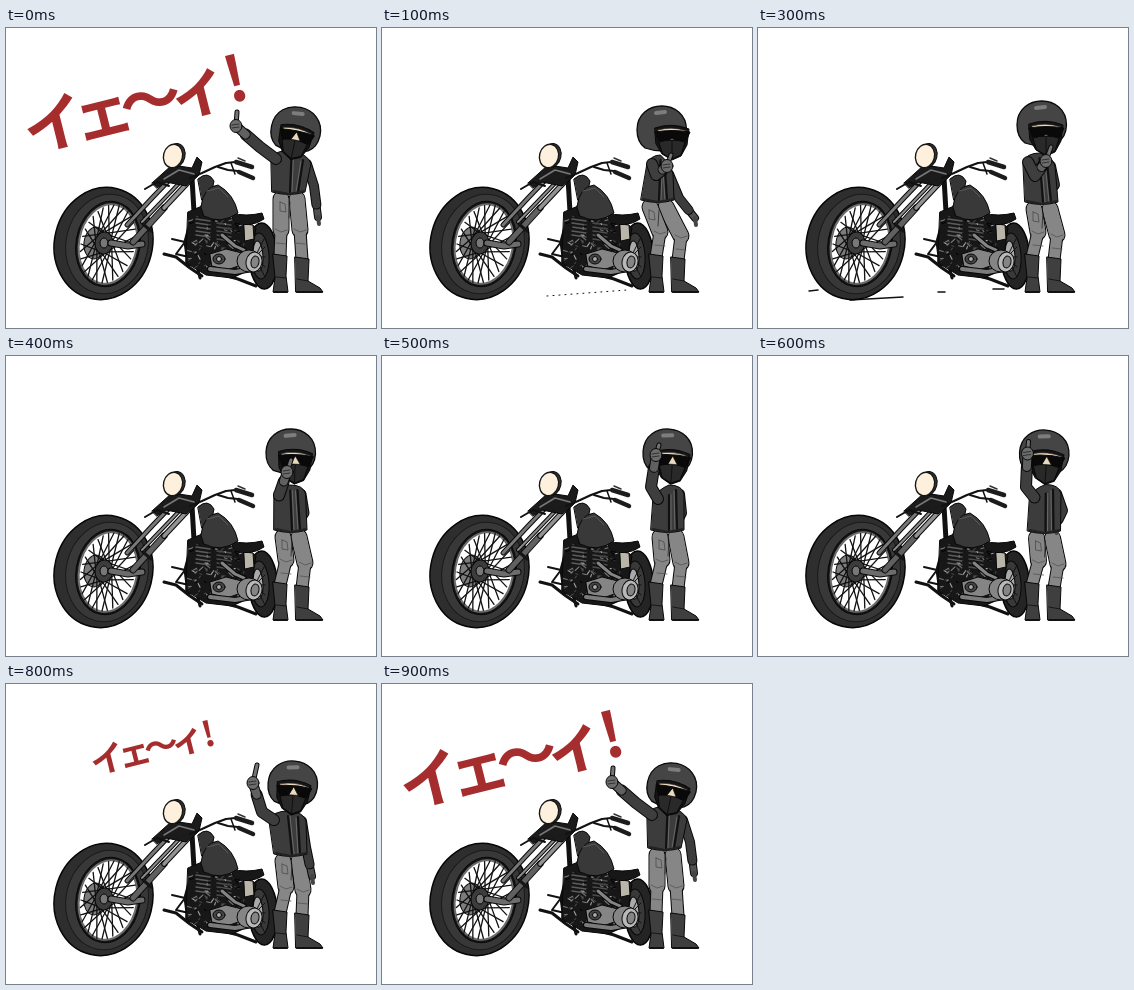
An HTML page that plays this animation: 370 px wide and 300 px high, repeating every 1000 ms.

```html
<!DOCTYPE html>
<html lang="ja">
<head>
<meta charset="utf-8">
<style>
html, body { margin: 0; width: 100%; height: 100%; overflow: hidden; background: #fff; }
svg { display: block; width: 100vw; height: 100vh; }
text {
  font: 700 62px "Noto Sans CJK JP", "Noto Sans CJK", sans-serif;
  letter-spacing: -0.2em; fill: #a52d2e; text-anchor: middle;
}
</style>
</head>
<body>
<svg viewBox="0 0 370 300" stroke-linecap="round" stroke-linejoin="round">
  <g id="shadow" fill="none" stroke="#111"></g>
  <g id="bike"></g>
  <g id="rider"></g>
  <text id="shout" y="23.5">イェ～ィ<tspan dx="8">!</tspan></text>
</svg>
<script>
const STEP = 100, STEPS = 10;
const $ = id => document.getElementById(id);
const mix = (a, b, t) => a + (b - a) * t;
const between = (p, q, t) => p.map((v, i) => mix(v, q[i], t));

function shape(d, fill, stroke = '#080808', width = 1) {
  return `<path d="${d}" fill="${fill}" stroke="${stroke}" stroke-width="${width}"/>`;
}
function line(points, width, color) {
  return shape('M' + points.map(p => p.join(' ')).join('L'), 'none', color, width);
}
function tube(points, width, color) {
  return line(points, width + 2, '#080808') + line(points, width, color);
}
function oval(x, y, rx, ry, fill, turn = 0, stroke = '#080808', width = 1) {
  return `<ellipse cx="${x}" cy="${y}" rx="${rx}" ry="${ry}" fill="${fill}" stroke="${stroke}"
    stroke-width="${width}" transform="rotate(${turn} ${x} ${y})"/>`;
}
function seeded(seed) {
  return () => (seed = (seed * 16807) % 2147483647) / 2147483647;
}

function frontWheel() {
  let s = oval(97.5, 215.5, 49, 56.5, '#2e2e2e', 14, '#050505', 1.5);
  s += oval(101, 216, 41, 50, '#383838', 12, '#1a1a1a', 1);
  s += oval(102, 216, 32, 43, '#161616', 10);
  s += oval(102, 216, 29, 40, '#fff', 10, '#6c6c6c', 2);
  s += oval(89, 215, 11, 16, '#7c7c7c', 8);
  for (let i = 0; i < 32; i++) {
    const a = i * Math.PI / 16, b = a + (i % 2 ? 0.9 : -0.9);
    const rim = [102 + 27 * Math.cos(a) - 6 * Math.sin(a), 216 + 39 * Math.sin(a)];
    s += line([[98 + 8 * Math.cos(b), 215 + 10 * Math.sin(b)], rim], 1.3, '#111');
  }
  return s + oval(98, 215, 9, 11, '#3c3c3c', 8) + oval(98, 215, 4, 5, '#777');
}

function engine() {
  const rnd = seeded(77);
  let s = shape('M182 184L196 178L230 190L250 199L244 242L226 250L200 247L180 235Z', '#171717');
  for (let i = 0; i < 5; i++) {
    s += line([[190, 191 + i * 4], [204, 193 + i * 4]], 1.4, '#5c5c5c');
    s += line([[211, 195 + i * 4], [225, 197 + i * 4]], 1.4, '#4c4c4c');
  }
  for (let i = 0; i < 100; i++) {
    const x = 184 + rnd() * 58, y = 188 + rnd() * 54;
    const color = ['#050505', '#444', '#777', '#a4a4a4'][Math.floor(rnd() * 4)];
    s += line([[x, y], [x + rnd() * 8 - 4, y + rnd() * 6 - 2]], 1.1, color);
  }
  s += tube([[216, 207], [229, 218], [238, 222]], 3, '#858585');
  s += shape('M238 196L247 197L248 211L239 213Z', '#b9b5a8');
  s += shape('M204 226L220 221L236 225L238 236L221 242L206 238Z', '#858585');
  s += oval(213, 231, 6, 5, '#444') + oval(213, 231, 2.5, 2.5, '#aaa');
  s += tube([[204, 241], [229, 244], [246, 241]], 4, '#7c7c7c');
  s += oval(243, 233, 12, 11, '#858585') + oval(248, 234, 8, 10, '#b8b8b8', 12);
  return s + oval(249, 234, 4, 6, '#858585', 12);
}

function bike() {
  let s = oval(257, 228, 14.5, 33, '#242424', -3, '#050505', 1.5);
  s += oval(254, 228, 9, 23, '#393939', -3) + oval(252, 228, 5, 15, '#aaa', -3);
  for (let i = -2; i < 3; i++) s += line([[249, 229], [259, 229 + i * 10]], 1, '#111');
  s += line([[186, 150], [188, 184], [180, 214], [183, 236]], 5, '#111');
  s += line([[196, 178], [203, 243], [232, 251], [250, 258]], 3, '#111');
  s += line([[158, 226], [170, 229], [184, 240], [196, 248]], 3, '#111');
  s += line([[166, 211], [179, 214], [170, 226], [183, 229]], 2, '#111');
  s += line([[191, 238], [194, 250]], 3, '#111');
  s += engine();
  s += shape('M225 185Q240 189 256 185L258 191Q245 200 229 195Z', '#171717');
  s += shape('M192 151Q202 142 208 153L205 168L196 172Z', '#353535');
  s += shape('M195 179Q197 159 212 157Q228 166 232 185Q215 197 198 188Z', '#393939');
  s += line([[201, 163], [213, 160], [222, 169]], 1, '#5a5a5a');
  s += frontWheel();
  s += tube([[121, 197], [147, 169], [174, 141]], 3, '#777');
  s += tube([[136, 194], [180, 148]], 2, '#8a8a8a');
  s += tube([[105, 215], [122, 218], [136, 216]], 5, '#6c6c6c');
  s += tube([[127, 214], [158, 180]], 5, '#606060');
  s += tube([[158, 180], [190, 146]], 3.5, '#929292');
  s += line([[137, 196], [145, 203]], 3, '#151515');
  s += shape('M146 155L166 137L186 140L191 129L196 134L193 147L180 158L160 154L151 160Z', '#1b1b1b');
  s += line([[158, 151], [173, 142], [188, 146]], 1.5, '#777');
  s += line([[139, 161], [151, 154], [163, 158]], 2, '#111');
  s += line([[184, 150], [196, 145], [209, 139], [220, 135], [229, 134]], 2.2, '#111');
  s += line([[212, 139], [222, 142], [232, 143]], 2, '#111');
  s += line([[230, 134], [246, 139]], 4.5, '#1c1c1c');
  s += line([[233, 144], [247, 150]], 4.5, '#1c1c1c');
  s += line([[225, 135], [229, 146]], 1.5, '#111') + line([[232, 130], [239, 133]], 1.5, '#333');
  s += oval(170, 127.5, 9, 12, '#333', 12);
  return s + oval(167, 128, 9.5, 11.8, '#fdf0dc', 14, '#171717', 1.4);
}

// Joints: arm and free hold shoulder, elbow and hand; tip is the raised finger.
const poses = {
  0: { head: [290, 103], tilt: [12], face: [291, 108], arm: [[270, 131], [254, 119], [230, 98]], tip: [231, 84],
       free: [[301, 136], [308, 158], [312, 189]], hip: [283, 164], knees: [[275, 202], [294, 202]], nose: [1] },
  1: { head: [280, 102], tilt: [0], face: [290, 108], arm: [[270, 136], [274, 147], [285, 138]], tip: [289, 127],
       free: [[287, 146], [297, 170], [313, 190]], hip: [276, 172], knees: [[278, 204], [299, 208]], nose: [0] },
  3: { head: [284, 97], tilt: [0], face: [288, 104], arm: [[270, 134], [277, 148], [288, 133]], tip: [293, 119],
       free: [[293, 138], [297, 157], [291, 164]], hip: [284, 174], knees: [[280, 204], [299, 207]], nose: [0] },
  5: { head: [286, 97], tilt: [4], face: [291, 104], arm: [[276, 143], [269, 131], [274, 99]], tip: [277, 89],
       free: [[298, 138], [300, 157], [295, 167]], hip: [286, 174], knees: [[280, 204], [299, 207]], nose: [1] },
  7: { head: [287, 99], tilt: [4], face: [287, 105], arm: [[277, 140], [267, 131], [265, 96]], tip: [264, 82],
       free: [[300, 137], [310, 152], [300, 173]], hip: [287, 176], knees: [[281, 206], [301, 209]], nose: [0] },
  8: { head: [287, 101], tilt: [5], face: [288, 107], arm: [[268, 136], [256, 128], [247, 99]], tip: [251, 81],
       free: [[296, 137], [300, 163], [306, 192]], hip: [285, 170], knees: [[280, 203], [297, 206]], nose: [1] }
};
poses[9] = poses[0];

function poseAt(n) {
  if (poses[n]) return poses[n];
  const a = poses[n - 1], b = poses[n + 1], out = {};
  for (const key in a) {
    out[key] = a[key].map((v, i) => Array.isArray(v) ? between(v, b[key][i], 0.5) : mix(v, b[key][i], 0.5));
  }
  return out;
}

function legs({ hip: [x, y], knees }) {
  const pants = '#868686';
  const ankles = [[274, 229], [296, 232]];
  let s = '';
  for (const i of [1, 0]) {
    const knee = knees[i], top = [x + (i ? 8 : -8), y + 7];
    s += tube([top, knee], 15, pants) + tube([knee, ankles[i]], 11, pants);
    s += line([top, knee], 14.5, pants);
    s += line([[knee[0] - 6, knee[1] - 1], [knee[0], knee[1] + 2], [knee[0] + 6, knee[1]]], 0.8, '#555');
    s += line([[knee[0] - 5, knee[1] + 13], [knee[0] + 5, knee[1] + 14]], 0.8, '#555');
  }
  s += line([[x - 9, y + 10], [x - 4, y + 12], [x - 3, y + 20], [x - 9, y + 19], [x - 9, y + 10]], 0.8, '#4c4c4c');
  s += line([[x + 1, y + 10], [x, y + 26]], 0.9, '#333');
  s += shape('M267 226L281 228L280 248L282 264L267 264L269 250Z', '#3f3f3f');
  s += shape('M289 229L303 231L302 253L314 260L317 264L290 264Z', '#3f3f3f');
  s += line([[270, 249], [280, 250]], 0.9, '#111') + line([[291, 251], [302, 253]], 0.9, '#111');
  return s + line([[268, 264], [281, 264]], 2, '#111') + line([[291, 264], [316, 264]], 2, '#111');
}

function torso({ arm, free, hip: [x, y] }) {
  const [a, b] = arm[0], [c, d] = free[0];
  const left = a - 5, right = c + 4, mid = mix(a, c, 0.5);
  let s = shape(`M${left} ${b}Q${left + 4} ${b - 9} ${mid} ${Math.min(b, d) - 9}
    Q${right - 2} ${d - 9} ${right} ${d}L${x + 16} ${y}Q${x} ${y + 5} ${x - 17} ${y}Z`, '#3c3c3c');
  s += line([[mid, b - 4], [x + 1, y]], 2.2, '#111') + line([[mid + 2, b - 4], [x + 3, y]], 0.8, '#747474');
  s += line([[c - 4, d - 4], [x + 9, y]], 2.2, '#111') + line([[c - 6, d - 3], [x + 7, y]], 0.8, '#747474');
  return s + line([[x - 15, y - 1], [x, y + 2], [x + 15, y - 1]], 2, '#222');
}

function head({ head: [x, y], face: [u, v], tilt, nose }) {
  let s = shape(`M${x - 25} ${y}C${x - 25} ${y - 32} ${x + 24.5} ${y - 32} ${x + 24.5} ${y}
    Q${x + 24} ${y + 12} ${x + 16} ${y + 17}Q${x} ${y + 24} ${x - 17} ${y + 18}Q${x - 25} ${y + 12} ${x - 25} ${y}Z`,
    '#454545', '#0a0a0a', 1.3);
  s += line([[x - 6, y - 17], [x + 3, y - 18]], 4, '#7d7d7d');
  s += shape(`M${u - 17} ${v - 8}Q${u} ${v - 14} ${u + 17} ${v - 7}L${u + 15} ${v + 9}
    L${u + 9} ${v + 20}L${u} ${v + 24}L${u - 10} ${v + 18}L${u - 16} ${v + 8}Z`, '#151515');
  s += shape(`M${u - 14} ${v - 6}Q${u} ${v - 10} ${u + 15} ${v - 5}L${u + 13} ${v + 4}L${u - 12} ${v + 4}Z`, '#ead9bd', '#222', 0.6);
  s += shape(`M${u - 17} ${v - 4}Q${u} ${v - 7} ${u + 18} ${v - 4}L${u + 14} ${v + 5}L${u + 4} ${v + 5}
    L${u} ${v + 2}L${u - 4} ${v + 5}L${u - 13} ${v + 5}Z`, '#090909');
  s += shape(`M${u - 13} ${v + 6}Q${u} ${v + 2} ${u + 13} ${v + 6}L${u + 9} ${v + 19}L${u} ${v + 23}L${u - 9} ${v + 18}Z`, '#292929');
  s += line([[u, v + 5], [u, v + 22]], 0.8, '#0a0a0a');
  if (nose[0] >= 0.5) s += shape(`M${u} ${v - 4}L${u + 5} ${v + 4}L${u - 4} ${v + 4}Z`, '#ead9bd', '#111', 0.6);
  return `<g transform="rotate(${tilt[0]} ${x} ${y})">${s}</g>`;
}

function freeArm({ free }) {
  const [, elbow, hand] = free;
  const wrist = between(elbow, hand, 0.6);
  return tube([wrist, hand], 6, '#505050') + tube([free[0], elbow, wrist], 8, '#3c3c3c') +
    line([hand, [hand[0] + 1, hand[1] + 7]], 4, '#444');
}

function raisedArm({ arm, tip }) {
  const [shoulder, elbow, hand] = arm;
  const cuff = between(elbow, hand, 0.6);
  const [x, y] = hand;
  return tube([shoulder, elbow, cuff], 10, '#3e3e3e') + tube([cuff, hand], 8, '#606060') +
    tube([hand, tip], 3, '#747474') + oval(x, y, 6, 6.5, '#6c6c6c') +
    line([[x - 4, y - 1], [x + 3, y - 2]], 0.8, '#222') + line([[x - 4, y + 2], [x + 3, y + 1]], 0.8, '#222');
}

function shadow(n) {
  if (n === 1) return '<path d="M165 268L245 262" stroke-dasharray="1 5"/>';
  if (n === 3) return '<path d="M51 263L60 262M92 272L145 269M180 264L187 264M235 261L246 261" stroke-width="1.5"/>';
  return '';
}

// Centre and scale of the growing shout.
const shouts = { 7: [158, 57, 0.23], 8: [143, 64, 0.555], 9: [123, 76.5, 1] };
shouts[0] = shouts[9];

function draw(n) {
  const pose = poseAt(n), shout = shouts[n];
  $('rider').innerHTML = legs(pose) + freeArm(pose) + torso(pose) + head(pose) + raisedArm(pose);
  $('shadow').innerHTML = shadow(n);
  $('shout').style.display = shout ? '' : 'none';
  if (shout) {
    const [x, y, size] = shout;
    $('shout').setAttribute('transform', `translate(${x} ${y}) rotate(-14) scale(${size})`);
  }
}

let shown = -1;
const start = performance.now();
function tick(now) {
  const n = Math.floor(Math.max(0, now - start) / STEP) % STEPS;
  if (n !== shown) draw(shown = n);
  requestAnimationFrame(tick);
}
$('bike').innerHTML = bike();
tick(start);
</script>
</body>
</html>
```
